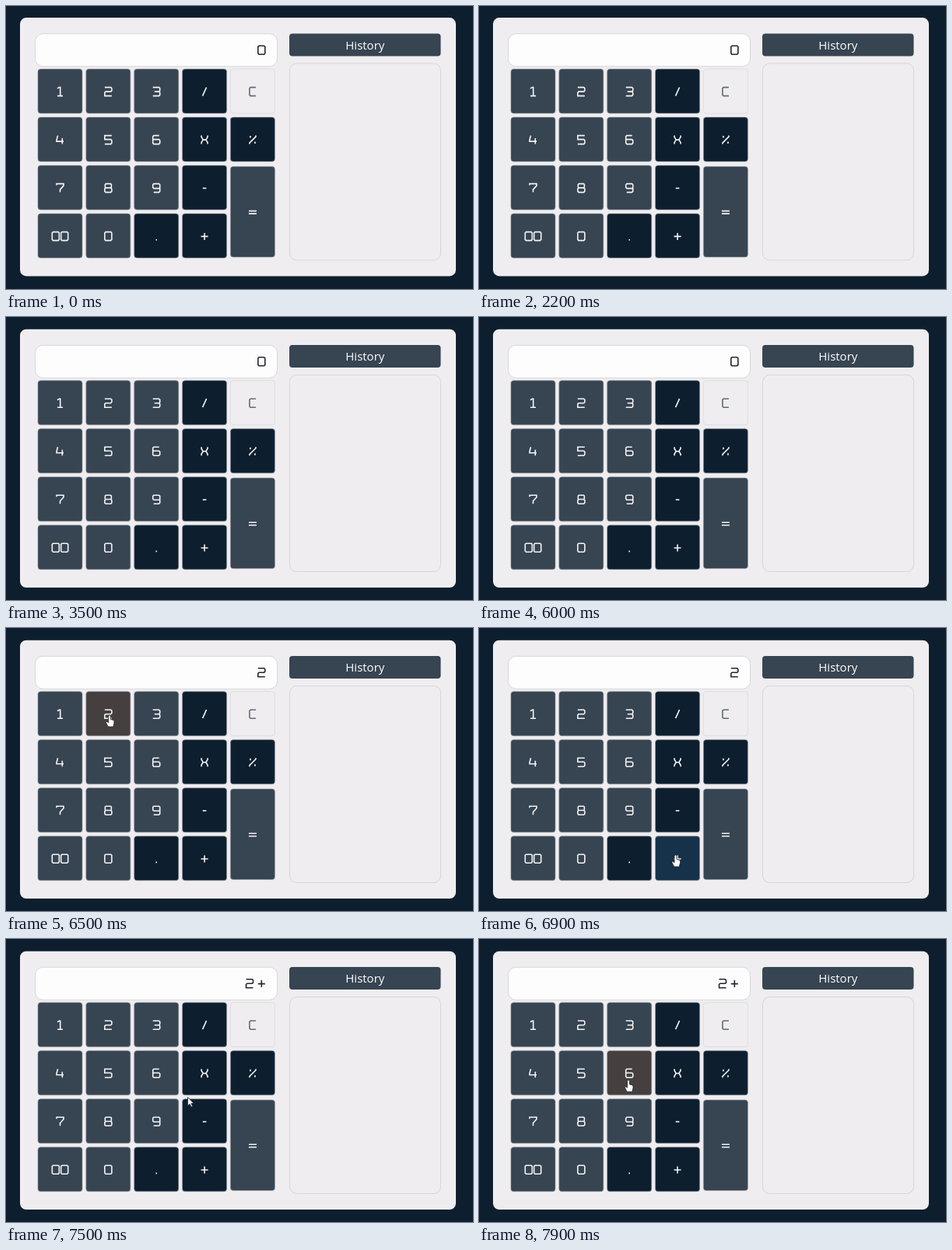
An HTML page for the animation above (8 s loop, 600x364 px).

```html
<!DOCTYPE html>
<html lang="en">
<head>
<meta charset="utf-8">
<title>Calculator</title>
<style>
  html, body { margin: 0; width: 100%; height: 100%; overflow: hidden; background: #0d1f2f; }
  svg { display: block; width: 100%; height: 100%; }
  text { font: 15px "Open Sans", "Noto Sans", sans-serif; fill: #fff; text-anchor: middle; }
  .glyph { fill: none; stroke-width: 1.6; }
</style>
</head>
<body>
<svg viewBox="0 0 600 364">
  <g id="page">
    <rect x="18" y="15.7" width="560" height="332.3" rx="8" fill="#efedef"/>
    <rect x="37.5" y="36.3" width="311" height="42" rx="10" fill="#fefdfe" stroke="#d6d7db"/>
    <rect x="364" y="36" width="194.5" height="29" rx="4" fill="#374452"/>
    <text x="461.3" y="56.2">History</text>
    <rect x="364.5" y="74.5" width="194" height="253" rx="9" fill="none" stroke="#d7d5d9"/>
    <g id="keys"></g>
    <g id="display"></g>
  </g>
  <path id="cursor" fill="#fff" stroke="#1b2229" stroke-width=".8"/>
</svg>
<script>
const LOOP = 8000, STEP = 100;
const SLATE = '#374452', DARK = '#0d1f2f', LIGHT = '#efedef';
const HOVER = { [SLATE]: '#45403f', [DARK]: '#16324a', [LIGHT]: '#e2e0e2' };

// Squared letterforms as centre lines in a 9 by 11 box.
const GLYPHS = {
  0: 'M1.2 0H7.8L9 1.2V9.8L7.8 11H1.2L0 9.8V1.2Z',
  1: 'M1 1.5L3.5 0H4.7V11M1 11H8',
  2: 'M0 0H7.8L9 1.2V4.3L7.8 5.5H1.2L0 6.7V11H9',
  3: 'M0 0H7.8L9 1.2V4.3L7.8 5.5H2M7.8 5.5L9 6.7V9.8L7.8 11H0',
  4: 'M1.5 0L0 6V7.5H9M7.3 3.5V11',
  5: 'M9 0H0V5H7.8L9 6.2V9.8L7.8 11H0',
  6: 'M8 0H1.2L0 1.2V9.8L1.2 11H7.8L9 9.8V6.2L7.8 5H0',
  7: 'M0 2V0H9V2.5L4.5 7.5V11',
  8: 'M1.5 0H7.5L8.5 1V4.5L7.5 5.3H1.5L.5 4.5V1ZM1.5 5.3L0 6.5V9.8L1.2 11H7.8L9 9.8V6.5L7.5 5.3',
  9: 'M1 11H7.8L9 9.8V1.2L7.8 0H1.2L0 1.2V4.8L1.2 6H9',
  '/': 'M2 11L7 0',
  X: 'M.5 0V2L2.7 5.5L.5 9V11M8.5 0V2L6.3 5.5L8.5 9V11M2.7 5.5H6.3',
  '%': 'M.5 11V9.5L8.5 1.5V0M1.5 .5V3M7.5 8V10.5',
  C: 'M8.5 0H1.7L.5 1.2V9.8L1.7 11H8.5',
  '-': 'M2.2 5.8H6.8',
  '=': 'M-.5 4H9.5M-.5 7.5H9.5',
  '+': 'M0 5.8H9M4.5 1.3V10.3',
  '.': 'M3.7 10.2H5.3'
};
const ARROW = 'M0 0V11L2.6 8.7L4.4 12.5L6.2 11.7L4.4 8H7.7Z';
const HAND = 'M-1.5 1Q0 -1 1.5 1V5.5L5 6.4Q6.4 7 6 10L4.8 15H-1.8L-4.6 9.6Q-4.6 7.8 -3 8.6L-1.5 9.8Z';

const byId = id => document.getElementById(id);
const page = byId('page'), display = byId('display'), cursor = byId('cursor');

// Draws a label whose first character is centred on cx, cy.
const write = (label, cx, cy, color, advance) => [...label].map((c, i) => GLYPHS[c]
  ? `<path class="glyph" d="${GLYPHS[c]}" stroke="${color}"
      transform="translate(${cx + i * advance - 4.5} ${cy - 5.5})"/>` : '').join('');

const keys = [];
['1 2 3 / C', '4 5 6 X %', '7 8 9 - =', '00 0 . +'].forEach((row, r) =>
  row.split(' ').forEach((label, c) => {
    const tall = label === '=';
    const fill = label === 'C' ? LIGHT : '/X%-+.'.includes(label) ? DARK : SLATE;
    keys.push({ label, fill, x: 41 + c * 61.85, y: 81.7 + r * 62 + (tall ? 1.3 : 0), w: 57, h: tall ? 116.5 : 57 });
  }));
byId('keys').innerHTML = keys.map(k => {
  const ink = k.label === 'C' ? '#626b75' : '#f3f3f4';
  const edge = k.label === 'C' ? '#d3d2d6' : '#8d949c';
  const cx = k.x + k.w / 2 - (k.label.length - 1) * 5.7;
  return `<g aria-label="${k.label}"><rect x="${k.x}" y="${k.y}" width="${k.w}" height="${k.h}" rx="3.5"
    stroke="${edge}" stroke-width=".6"/>${write(k.label, cx, k.y + k.h / 2 + .5, ink, 11.4)}</g>`;
}).join('');
keys.forEach((k, i) => k.rect = byId('keys').children[i].firstChild);

// Pointer stops: time, x, y.
const route = [
  [6000, 150, -25], [6100, 148, 4], [6300, 133, 112], [6500, 133, 112], [6700, 193, 180],
  [6800, 230, 272], [6900, 252.5, 292], [7300, 252.5, 292], [7400, 247, 255],
  [7500, 233.5, 203.5], [7700, 192, 181.5], [LOOP, 192, 181.5]
];
function pointerAt(t) {
  if (t < route[0][0]) return [-50, -50];
  const i = route.findIndex(stop => stop[0] > t);
  const [t0, x0, y0] = route[i - 1], [t1, x1, y1] = route[i];
  const p = (t - t0) / (t1 - t0);
  return [x0 + (x1 - x0) * p, y0 + (y1 - y0) * p];
}

let shown;
function draw(now) {
  const t = Math.floor(now % LOOP / STEP) * STEP;
  page.setAttribute('transform', `translate(0 ${t < 2400 ? -.6 : 0})`);

  const [x, y] = pointerAt(t);
  let over = false;
  for (const k of keys) {
    const hit = x >= k.x && x <= k.x + k.w && y >= k.y && y <= k.y + k.h;
    k.rect.setAttribute('fill', hit ? HOVER[k.fill] : k.fill);
    over ||= hit;
  }
  cursor.setAttribute('d', over ? HAND : ARROW);
  cursor.setAttribute('transform', `translate(${x} ${y})`);

  const value = t < 6400 ? '0' : t < 7300 ? '2' : '2+';
  if (value !== shown) {
    shown = value;
    display.setAttribute('aria-label', value);
    display.innerHTML = write(value, 328.3 - (value.length - 1) * 15.3, 57.3, '#23272c', 15.3);
  }
  requestAnimationFrame(draw);
}
requestAnimationFrame(draw);
</script>
</body>
</html>
```
